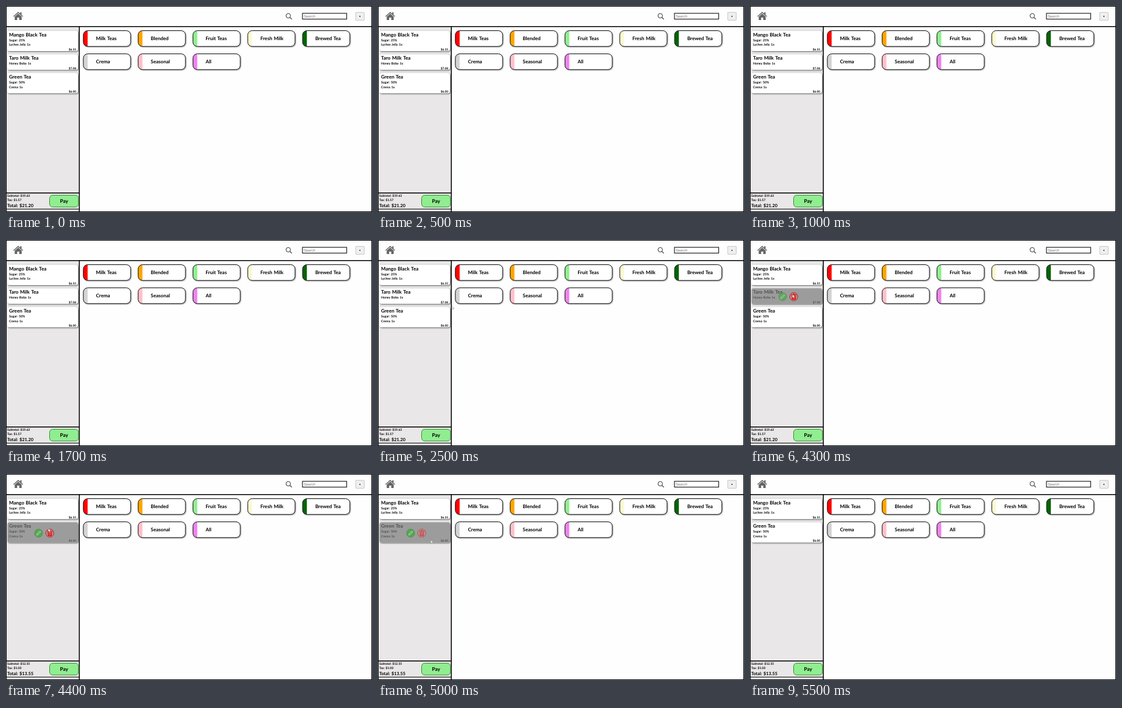
An HTML page for the animation above (7400 ms loop, 600 by 338 pixels).

```html
<!DOCTYPE html>
<html lang="en">
<head>
<meta charset="utf-8">
<title>Tea shop order</title>
<style>
  html, body { margin: 0; width: 100%; height: 100%; overflow: hidden; background: #fff; }
  svg { display: block; width: 600px; height: 338px; }
  text { font: 700 8px Lato, "Open Sans", sans-serif; word-spacing: .08em; text-rendering: geometricPrecision; }
  .sub { font-size: 5.2px; }
  .price { font-size: 4.8px; text-anchor: end; }
  .sum { font-size: 5px; }
  .total { font-size: 7.3px; }
  .pay { font-size: 8.3px; text-anchor: middle; }
  .hint { font: 400 6px "Liberation Sans", Arial, sans-serif; fill: #757575; }
  .card > rect:first-child { fill: #fff; filter: drop-shadow(1px 1.2px .8px #0009); }
  .category > rect { filter: drop-shadow(1.6px 1.6px 1px #0008); }
  .line { fill: none; stroke: #000; stroke-width: 1.5; }
  .shade { fill: #737373; fill-opacity: .7; }
  .trash { color: #d23b3b; }
  .trash.hot { color: #e60000; }
  .trash path, .trash circle { stroke: currentColor; }
</style>
</head>
<body>
<svg viewBox="0 0 600 338">
  <rect width="600" height="338" fill="#fefefe"/>
  <rect x="0" y="34" width="120" height="304" fill="#e9e7e7"/>

  <g id="header">
    <path d="M12 16.8 20 9.6l3.3 3V10.2h2.2v4.4l2.5 2.2-.9 1-7.1-6.3-7.1 6.3z" fill="#666"/>
    <path d="M14.3 17.5 20 12.5l5.7 5v5.5h-4v-4h-3.4v4h-4z" fill="#666"/>
    <circle cx="462.7" cy="16" r="3.7" fill="none" stroke="#333"/>
    <path d="M465.4 18.7 468.6 21.9" stroke="#333" stroke-width="1.2"/>
    <rect x="486" y="12" width="72.5" height="9.5" fill="#fff" stroke="#222" stroke-width="1.2"/>
    <text class="hint" x="488" y="18.6">Search</text>
    <rect x="573.3" y="10.4" width="14" height="13" rx=".6" fill="#efefef" stroke="#b5b5b5" stroke-width=".7"/>
    <circle cx="580.2" cy="17" r=".9" fill="#222"/>
  </g>

  <g id="categories"></g>
  <g id="order"></g>

  <g id="tools">
    <g class="pencil">
      <circle r="6.6" fill="#56a556" stroke="#3f963f" stroke-width=".8"/>
      <path d="M-3 3.2-2.4 1 2 -3.4 3.4 -2-1 2.4z" fill="none" stroke="#d5e8d5" stroke-width=".8"/>
    </g>
    <g class="trash" transform="translate(18.3)">
      <circle r="6.5" fill="#fff" fill-opacity=".15" stroke-width="1"/>
      <path d="M-4.4-3.1H4.4M-1.5-4.5H1.5" stroke-width="1.2"/>
      <path d="M-3.3-2.2-2.7 4.2H2.7L3.3-2.2M-1.2-2V4M1.2-2V4" fill="none" stroke-width="1.2"/>
    </g>
  </g>

  <path class="line" d="M0 33.7H600M120.2 34V338M0 306.8H120"/>
  <path class="line" d="M0 333.2H120" style="stroke-width:1"/>
  <rect class="line" x=".5" y=".5" width="599" height="337" style="stroke-width:1"/>
  <text class="sum" id="subtotal" x="2" y="312.8"></text>
  <text class="sum" id="tax" x="2" y="320.4"></text>
  <text class="total" id="total" x="2" y="329.6"></text>
  <rect x="71.5" y="310.5" width="47.3" height="19.3" rx="5" fill="#90ee90" stroke="#2f8f2f"/>
  <text class="pay" x="95.2" y="322.7">Pay</text>

  <path id="cursor" d="M0 0V5.2L1.3 4.1 2.1 5.9 3 5.5 2.2 3.8H3.8z" fill="#fff" stroke="#777" stroke-width=".45"/>
</svg>

<script>
const LOOP = 7400, STEP = 100, REMOVED = 4400;
const $ = id => document.getElementById(id);
const text = (x, y, s, cls = '') => `<text class="${cls}" x="${x}" y="${y}">${s}</text>`;

const categories = [
  ['Milk Teas', 'red'], ['Blended', 'orange'], ['Fruit Teas', 'lightgreen'],
  ['Fresh Milk', 'lightgoldenrodyellow'], ['Brewed Tea', 'darkgreen'],
  ['Crema', 'lightgray'], ['Seasonal', 'pink'], ['All', 'violet']
];

const mango = { name: 'Mango Black Tea', notes: ['Sugar: 25%', 'Lychee Jelly 1x'], price: '$6.55' };
const taro = { name: 'Taro Milk Tea', notes: ['Honey Boba 1x'], price: '$7.08' };
const green = { name: 'Green Tea', notes: ['Sugar: 50%', 'Crema 1x'], price: '$6.00' };

// Cursor stops: time, x, y
const enter = [[2300, 289, 143], [2400, 190, 122], [2500, 121, 108], [2600, 100, 101], [2800, 80, 94], [3000, 69.5, 89.5]];
const leave = [[4800, 69.5, 89.5], [4900, 74, 95], [5000, 86.5, 108.5], [5100, 150, 132], [5400, 503, 232]];
const path = [...enter, ...leave];

$('categories').innerHTML = categories.map(([name, color], i) => {
  const x = 126.8 + i % 5 * 89.85, y = i < 5 ? 40.5 : 78.5;
  return `<g class="category" transform="translate(${x} ${y})">
    <rect width="77.5" height="25.8" rx="7" fill="#fff"/>
    <path d="M7 0V25.8A7 7 0 0 1 0 18.8V7A7 7 0 0 1 7 0" fill="${color}"/>
    <rect width="77.5" height="25.8" rx="7" fill="none" stroke="#111" style="filter:none"/>
    ${text(20.7, 15.5, name)}</g>`;
}).join('');

const heightOf = item => 18 + 7.6 * item.notes.length;

function drawOrder(items, hovered) {
  let y = 40.8;
  $('order').innerHTML = items.map((item, i) => {
    const h = heightOf(item), top = y;
    y += h + 5.2;
    const box = `x="2.3" width="115.7" height="${h}" rx="3.5"`;
    return `<g class="card" transform="translate(0 ${top})"><rect ${box}/>
      ${text(5, 9.2, item.name)}
      ${item.notes.map((s, n) => text(5, 17 + n * 7.5, s, 'sub')).join('')}
      ${text(115, h - 1, item.price, 'price')}
      ${hovered && i === 1 ? `<rect class="shade" ${box}/>` : ''}</g>`;
  }).join('');
}

function cursorAt(t) {
  if (t < path[0][0] || t > path.at(-1)[0]) return null;
  const i = Math.max(1, path.findIndex(p => p[0] >= t));
  const [t0, x0, y0] = path[i - 1], [t1, x1, y1] = path[i];
  const k = (t - t0) / (t1 - t0);
  return [x0 + (x1 - x0) * k, y0 + (y1 - y0) * k];
}

function render(t) {
  const removed = t >= REMOVED;
  const items = removed ? [mango, green] : [mango, taro, green];
  const pos = cursorAt(t);
  const h = heightOf(items[1]), top = 79.2;
  const hovered = !!pos && pos[0] < 118 && pos[1] > top && pos[1] < top + h;
  drawOrder(items, hovered);

  const cy = removed ? 97 : 93;
  const tools = $('tools');
  tools.style.display = hovered ? '' : 'none';
  tools.setAttribute('transform', `translate(53.5 ${cy})`);
  tools.querySelector('.pencil').setAttribute('opacity', removed ? 1 : .8);
  tools.querySelector('.trash').classList.toggle('hot',
    hovered && Math.hypot(pos[0] - 71.8, pos[1] - cy) < 8);

  const [sub, tax, total] = removed ? ['12.55', '1.00', '13.55'] : ['19.63', '1.57', '21.20'];
  $('subtotal').textContent = 'Subtotal: $' + sub;
  $('tax').textContent = 'Tax: $' + tax;
  $('total').textContent = 'Total: $' + total;

  const cursor = $('cursor');
  cursor.style.display = pos ? '' : 'none';
  if (pos) cursor.setAttribute('transform', `translate(${pos})`);
}

let last = -1;
function tick() {
  const t = Math.floor(performance.now() % LOOP / STEP) * STEP;
  if (t !== last) render(last = t);
  requestAnimationFrame(tick);
}
tick();
</script>
</body>
</html>
```
